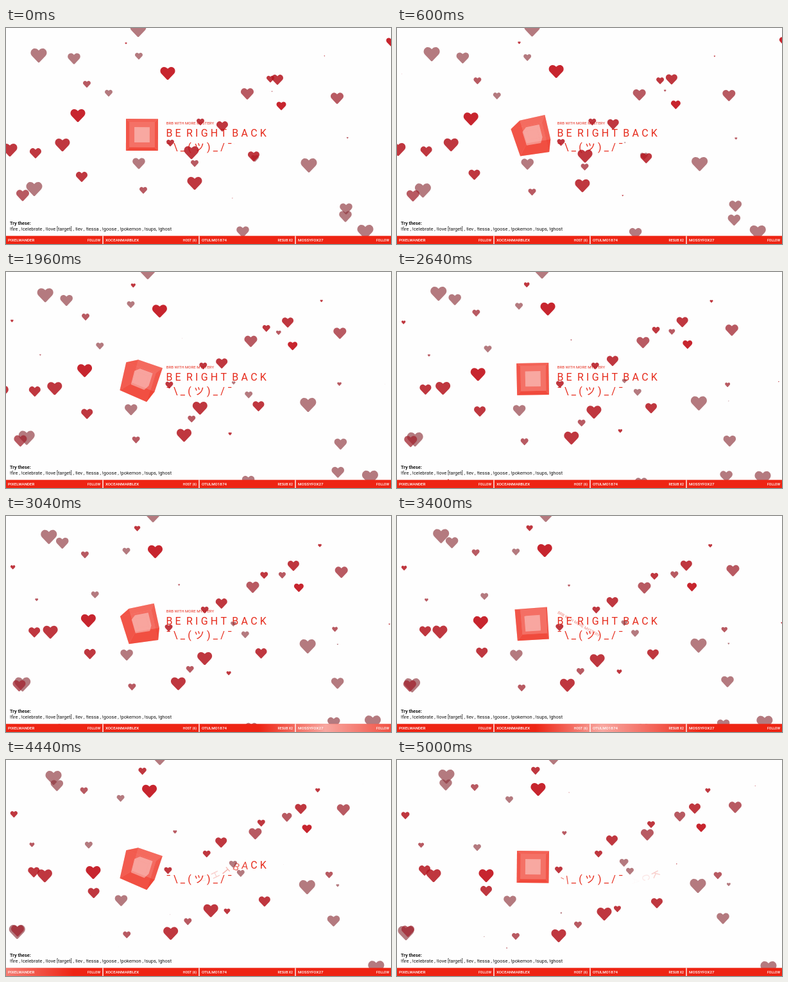
An HTML page for the animation above (5.04 s loop, 600 by 338 pixels).

```html
<!DOCTYPE html>
<html lang="en">
<head>
<meta charset="utf-8">
<title>Be right back</title>
<style>
html, body { margin: 0; width: 100%; height: 100%; overflow: hidden; background: #fefefe; }
svg { display: block; width: 100%; height: 100%; }
text { font-family: Roboto, "Noto Sans CJK JP", sans-serif; white-space: pre; }
.note { fill: #151515; }
.bar { fill: #fff; font-weight: 500; }
.title { fill: #e62b1c; }
</style>
</head>
<body>
<svg viewBox="0 0 600 338">
  <defs>
    <linearGradient id="shine">
      <stop offset="0" stop-color="#fff" stop-opacity="0"/>
      <stop offset=".4" stop-color="#fff" stop-opacity=".6"/>
      <stop offset="1" stop-color="#fff" stop-opacity="0"/>
    </linearGradient>
  </defs>
  <rect width="600" height="338" fill="#fefefe"/>
  <g id="cube"></g>
  <g id="titles"></g>
  <g id="hearts"></g>
  <g id="notes"></g>
  <g id="ticker"></g>
</svg>
<script>
const LOOP = 5040;
const byId = id => document.getElementById(id);
const clamp = v => Math.max(0, Math.min(1, v));

function add(parent, tag, attrs, text) {
  const el = document.createElementNS('http://www.w3.org/2000/svg', tag);
  for (const k in attrs) el.setAttribute(k, attrs[k]);
  if (text) el.textContent = text;
  parent.appendChild(el);
  return el;
}

// Hearts
const HEART = 'M0 .44Q-.03 .44-.05 .42L-.42 .03C-.53-.085-.53-.27-.4-.38C-.29-.47-.14-.45-.04-.35' +
  'L0-.31L.04-.35C.14-.45 .29-.47 .4-.38C.53-.27 .53-.085 .42 .03L.05 .42Q.03 .44 0 .44Z';
const PALE = 'rgba(140,50,58,.65)', MID = 'rgba(160,35,45,.75)';
const RED = 'rgba(180,22,32,.86)', BRIGHT = 'rgba(194,18,28,.92)';
const hearts = [];

function addHeart(fill, x, y, dx, dy, width) {
  const el = add(byId('hearts'), 'path', { d: HEART, fill });
  hearts.push(t => {
    const s = t / 5000;
    el.setAttribute('transform', `translate(${x + dx * s} ${y + dy * s}) scale(${width(t)})`);
  });
}

// Each heart: start x, y and the way it drifts in five seconds
function drift(fill, width, ...list) {
  for (const heart of list) addHeart(fill, ...heart, () => width);
}
drift(PALE, 25, [51, 43, 26, -17], [44, 252, -30, 19], [560, 319, 19, 7], [206, 3, 38, -7], [472, 215, -3, -18]);
drift(PALE, 19.5, [106, 48, -30, -9], [207, 212, -31, 9], [530, 283, -22, -35], [529, 295, -30, 47], [369, 319, 22, 22]);
drift(PALE, 12, [207, 44, -32, 18], [160, 102, -35, 35], [388, 204, -25, -30]);
drift(MID, 20, [376, 103, 14, 14], [516, 110, 11, -36], [26, 262, -9, 6]);
drift(MID, 12, [126, 88, -5, -45], [214, 254, -29, 22], [294, 212, -12, 46]);
drift(RED, 23, [88, 183, -31, -2], [6, 191, -35, -8], [294, 243, -42, 32], [289, 195, 34, 46]);
drift(RED, 18, [118, 233, 21, -28], [337, 154, -2, -28], [423, 81, 41, -5], [386, 201, 19, 23], [46, 196, -3, -23]);
drift(RED, 12, [256, 180, -4, -8], [303, 147, 11, 0], [412, 80, -16, 21]);
drift(BRIGHT, 23, [252, 71, -32, -25], [112, 137, 27, 44]);
drift(BRIGHT, 15, [429, 122, 45, -16], [600, 22, 28, -9]);

// Specks that are born on the way and grow
let seed = 11;
const rnd = (a, b) => {
  seed = (seed * 16807) % 2147483647;
  return a + (b - a) * seed / 2147483647;
};
for (let i = 0; i < 18; i++) {
  const birth = rnd(-1500, 4600), rate = rnd(.0012, .0032);
  addHeart([RED, MID, RED, PALE][i % 4], rnd(0, 600), rnd(10, 320), rnd(-40, 40), rnd(-40, 40),
    t => Math.max(0, t - birth) * rate);
}

// Titles: each piece swings down on its lower left corner and fades
const titles = [];
function addPiece(str, x, y, size, start, length) {
  const el = add(byId('titles'), 'text', { class: 'title', 'font-size': size }, str);
  titles.push(t => {
    const p = clamp((t - start) / length);
    el.setAttribute('transform', `translate(${x} ${y + 16 * p * p}) rotate(${95 * p})`);
    el.setAttribute('opacity', (1 - p) ** 1.4);
  });
}
const pen = document.createElement('canvas').getContext('2d');
function addLetters(str, x, y, size, gap, start) {
  pen.font = size + 'px Roboto, "Noto Sans CJK JP", sans-serif';
  [...str].forEach((ch, i) => {
    if (ch !== ' ') addPiece(ch, x, y, size, start + i * 95, 635);
    x += pen.measureText(ch).width + (ch === ' ' ? 0 : gap);
  });
}
addPiece('BRB WITH MORE MYSTERY', 249.7, 150.6, 6.1, 3140, 830);
addLetters('BE RIGHT BACK', 249.4, 169.8, 16, 4.25, 3445);
addLetters('¯\\_(ツ)_/¯', 249.5, 191.6, 16, 4.2, 4820);

// Cube within a cube
const EYE = 185, CX = 212, CY = 167;
const FACES = [];
for (let axis = 0; axis < 3; axis++)
  for (const side of [-1, 1])
    FACES.push([[-1, -1], [1, -1], [1, 1], [-1, 1]].map(([a, b]) => {
      const v = [];
      v[axis] = side; v[(axis + 1) % 3] = a; v[(axis + 2) % 3] = b;
      return v;
    }));

// Draws back before the move and overshoots after it
function backEase(u) {
  const half = v => v * v * (3.4 * v - 2.4) / 2;
  return u < .5 ? half(2 * u) : 1 - half(2 - 2 * u);
}

function spin(a, b, r) {
  return [a * Math.cos(r) - b * Math.sin(r), a * Math.sin(r) + b * Math.cos(r)];
}
function turn([x, y, z], p) {
  [z, x] = spin(z, x, Math.PI * p);
  [y, z] = spin(y, z, .63 * Math.sin(2 * Math.PI * p));
  [x, y] = spin(x, y, Math.PI * p);
  return [x, y, z];
}

const outer = FACES.map(() => add(byId('cube'), 'path', { fill: '#ee2c1c' }));
const inner = FACES.map(() => add(byId('cube'), 'path', { fill: '#fff', 'fill-opacity': .22 }));

function outline(face, half) {
  return 'M' + face.map(([x, y, z]) => {
    const s = half * EYE / (EYE - z * half);
    return (CX + x * s).toFixed(2) + ' ' + (CY + y * s).toFixed(2);
  }).join('L') + 'Z';
}

function drawCube(t) {
  const turnTime = LOOP / 2;
  const p = backEase((t - 30 + turnTime) % turnTime / turnTime);
  const middle = (face, k) => (face[0][k] + face[2][k]) / 2;
  const faces = FACES.map(f => f.map(v => turn(v, p)));
  faces.sort((a, b) => middle(a, 2) - middle(b, 2));
  faces.forEach((f, i) => {
    const shade = .43 + .22 * (1 - Math.abs(middle(f, 2))) + .1 * middle(f, 1);
    outer[i].setAttribute('d', outline(f, 22));
    outer[i].setAttribute('fill-opacity', shade);
    inner[i].setAttribute('d', outline(f, 11.2));
  });
}

// Notes and ticker
const notes = byId('notes'), ticker = byId('ticker');
add(notes, 'text', { class: 'note', x: 6, y: 308, 'font-size': 7.3, 'font-weight': 700 }, 'Try these:');
add(notes, 'text', { class: 'note', x: 6, y: 317.2, 'font-size': 7.5 },
  '!fire , !celebrate , !love [target] , !lev , !tessa , !goose , !pokemon , !sups, !ghost');

const strip = { y: 325.3, height: 12.7 };
add(ticker, 'rect', { ...strip, width: 600, fill: '#ee2413' });
const shine = add(ticker, 'rect', { ...strip, width: 260, fill: 'url(#shine)' });
[['PIXELWANDER', 'FOLLOW'], ['XOCEANMARBLEX', 'HOST (6)'], ['OTULMO1874', 'RESUB X2'], ['MOSSYFOX27', 'FOLLOW']]
  .forEach(([name, what], i) => {
    const x = i * 150;
    if (i) add(ticker, 'rect', { ...strip, x: x + .3, width: 1.4, fill: '#fefefe' });
    add(ticker, 'text', { class: 'bar', x: x + (i ? 5 : 3), y: 334, 'font-size': 6.2 }, name);
    add(ticker, 'text', { class: 'bar', x: x + 147, y: 333.6, 'font-size': 5.2, 'text-anchor': 'end' }, what);
  });

function drawShine(t) {
  const d = t - 3400;
  shine.setAttribute('x', 216 - .46 * d + .0001 * d * d);
}

function draw(t) {
  for (const move of hearts) move(t);
  for (const move of titles) move(t);
  drawCube(t);
  drawShine(t);
}

function tick() {
  draw(performance.now() % LOOP);
  requestAnimationFrame(tick);
}
tick();
</script>
</body>
</html>
```
